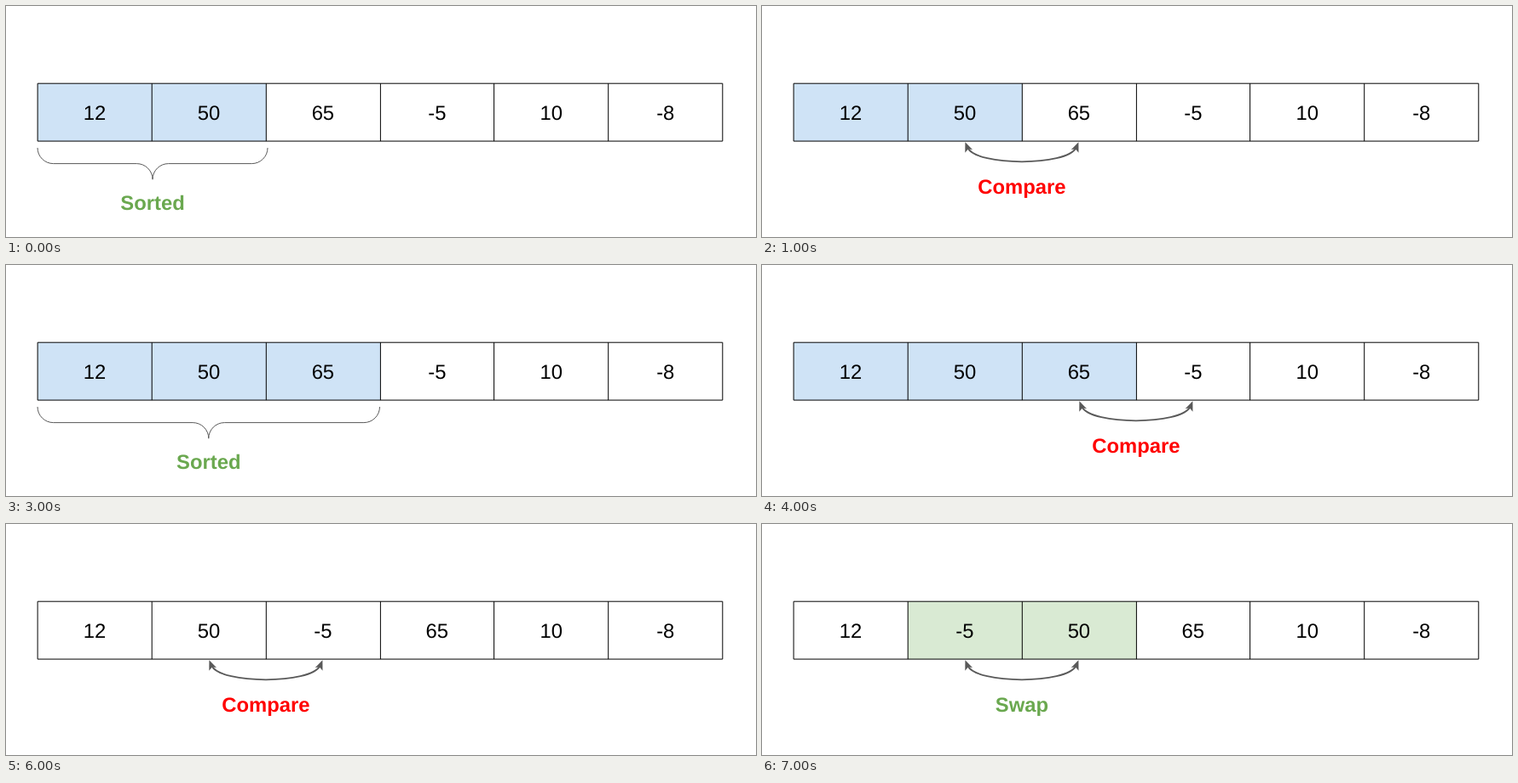
Animation, 880 px wide and 272 px high, one loop 8 s. Source, as an HTML page:

```html
<!DOCTYPE html>
<html lang="en">
<head>
<meta charset="utf-8">
<title>Insertion sort</title>
<style>
  html, body { margin: 0; width: 100%; height: 100%; overflow: hidden; background: #fff; }
  svg { display: block; }
  text { font: 23.8px "Liberation Sans", Arial, sans-serif; text-anchor: middle; text-rendering: geometricPrecision; }
  .label { font-weight: bold; }
</style>
</head>
<body>
<svg id="stage" width="880" height="272" viewBox="0 0 880 272"></svg>
<script>
const BLUE = '#cfe3f6', PALE = '#d9ead3', LEAF = '#6aa84f', FOREST = '#38761d', RED = '#f00', GREY = '#595959';
const LEFT = 37, PITCH = 133.95, TOP = 91.2, BOTTOM = 159.1, STEP = 1000;
// Borders snap to a grid of 0.9 px
const edge = i => 0.9 * Math.floor(41.65 + 148.8 * i) + 0.2;

const label = (text, x, y, color) => `<text class="label" x="${x}" y="${y}" fill="${color}">${text}</text>`;

function cells(values, from, to, fill) {
  let out = `<rect x="${edge(from)}" y="${TOP}" width="${edge(to) - edge(from)}" height="${BOTTOM - TOP}" fill="${fill}"/>`;
  values.forEach((v, i) => out += `<text x="${LEFT + PITCH * (i + 0.5)}" y="134">${v}</text>`);
  let grid = `M${edge(0)} ${TOP}H${edge(6)}V${BOTTOM}H${edge(0)}Z`;
  for (let i = 1; i < 6; i++) grid += `M${edge(i)} ${TOP}V${BOTTOM}`;
  return out + `<path d="${grid}" fill="none" stroke="#000"/>`;
}

function sorted(right) {
  const mid = (LEFT + right) / 2, r = 18.6;
  return `<path d="M${LEFT} 167a${r} ${r} 0 0 0 ${r} ${r}H${mid - r}a${r} ${r} 0 0 1 ${r} ${r}
    a${r} ${r} 0 0 1 ${r} ${-r}H${right - r}a${r} ${r} 0 0 0 ${r} ${-r}" fill="none" stroke="${GREY}"/>`
    + label('Sorted', mid, 239.5, LEAF);
}

// Double-headed arc under the border between two cells
function link(border, text, color) {
  const x = LEFT + PITCH * border;
  const head = side => `<path transform="translate(${x} 0) scale(${side} 1)" fill="${GREY}"
    d="M-66.5 160.3L-66.6 172.7L-62.8 168.3L-57.8 169.2Z"/>`;
  return `<path transform="translate(${x} 0)" d="M-63.5 167C-53 188.7 53 188.7 63.5 167" fill="none" stroke="${GREY}" stroke-width="1.8"/>`
    + head(1) + head(-1) + label(text, x, 221, color);
}

const start = [12, 50, 65, -5, 10, -8];
const once = [12, 50, -5, 65, 10, -8];
const twice = [12, -5, 50, 65, 10, -8];
const two = cells(start, 0, 2, BLUE), three = cells(start, 0, 3, BLUE);
const scenes = [
  two + sorted(307),
  two + link(2, 'Compare', RED),
  two + label('Nothing', 304.7, 214, FOREST) + label('happens', 304.7, 243, FOREST),
  three + sorted(438.5),
  three + link(3, 'Compare', RED),
  cells(once, 2, 4, PALE) + link(3, 'Swap', FOREST),
  cells(once, 0, 0, 'none') + link(2, 'Compare', RED),
  cells(twice, 1, 3, PALE) + link(2, 'Swap', LEAF)
];

const stage = document.getElementById('stage');
let shown = -1;
function draw() {
  const scene = Math.floor(performance.now() / STEP) % scenes.length;
  if (scene !== shown) stage.innerHTML = scenes[shown = scene];
  requestAnimationFrame(draw);
}
draw();
</script>
</body>
</html>
```
